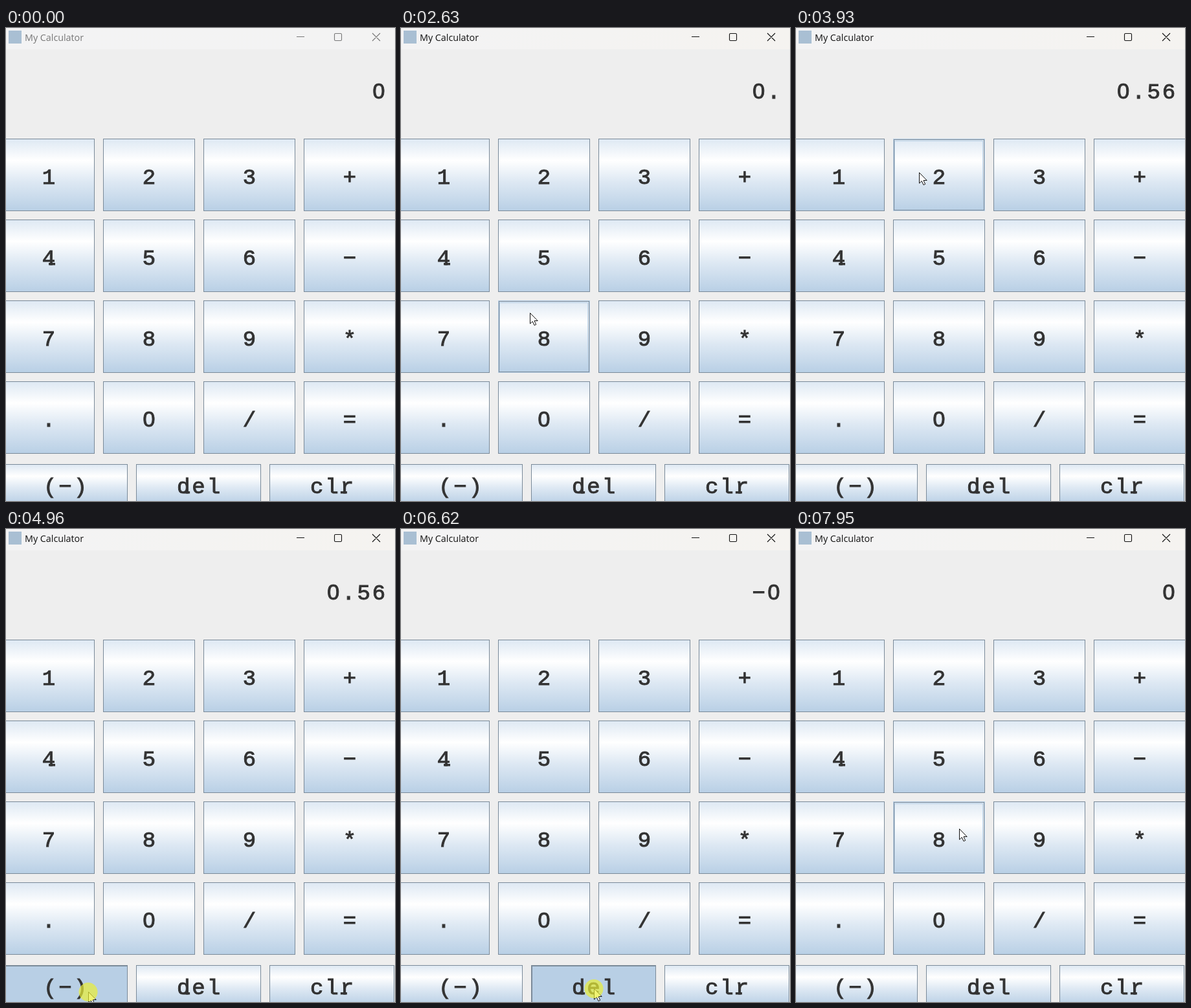
These frames come from a looping animation (601x731 px, 8 s). An HTML page with a canvas:

```html
<!DOCTYPE html>
<html lang="en">
<head>
<meta charset="utf-8">
<title>My Calculator</title>
<style>
  html, body { margin: 0; width: 100%; height: 100%; overflow: hidden; background: #eee; }
  canvas { display: block; }
</style>
</head>
<body>
<canvas id="stage" width="601" height="731"></canvas>
<script>
const ctx = document.getElementById('stage').getContext('2d');
const LOOP = 8000, STEP = 30, HOLD = 70;
const ADVANCE = 23.4;
const INK = '#333333', EDGE = '#7a8a99', BLUE = '#b8cfe5', DARK = '#111111', GREY = '#777777';

// Buttons: a 4 x 4 grid and a wider bottom row
const buttons = [...'123+456-789*.0/='].map((label, i) => ({
  label, x: -5 + 155 * (i % 4), y: 171 + 125 * Math.floor(i / 4), w: 142, h: 112
}));
['(-)', 'del', 'clr'].forEach((label, i) =>
  buttons.push({ label, x: -5 + 206 * i, y: 674, w: 193, h: 62 }));

// Pointer moves: start, end, then points passed at even intervals.
// Each move sets out from where the one before it came to rest.
const moves = [
  [380, 1030, [597, 724], [547, 482], [300, 153], [17, 158], [150, 166], [212, 450]],
  [1200, 1650, [170, 573], [125, 600], [110, 606]],
  [2330, 2930, [199, 440], [245, 362]],
  [3020, 3150, [385, 362]],
  [3690, 4290, [345, 128], [190, 223], [95, 400], [80, 580], [127, 715]],
  [5090, 5300, [298, 710]],
  [6990, 7790, [425, 430], [270, 205], [62, 512], [264, 493]],
  [7860, 7950, [252, 463]]
].map(([start, end, ...path], i, all) => ({
  start, end, path: i ? [all[i - 1].at(-1), ...path] : path
}));

const clicks = [
  [2220, '.'], [2950, '5'], [3330, '6'], [4960, '(-)'],
  [5530, 'del'], [5800, 'del'], [6080, 'del'], [6620, 'del']
];

function applyKey(shown, key) {
  if (key === '(-)') return '-' + shown;
  if (key === 'del') return shown.slice(0, -1).replace(/^-?$/, '0');
  return shown + key;
}

function spline(a, b, c, d, u) {
  return b + 0.5 * u * (c - a + u * (2 * a - 5 * b + 4 * c - d + u * (3 * (b - c) + d - a)));
}

function pointerAt(t) {
  const move = moves.filter(m => m.start <= t).pop();
  if (!move) return null;
  const { start, end, path } = move;
  const stepped = Math.floor((t - start) / STEP) * STEP;
  const pos = t >= end ? path.length - 1 : stepped / (end - start) * (path.length - 1);
  const i = Math.floor(pos);
  const near = k => path[Math.max(0, Math.min(path.length - 1, i + k))];
  const [x, y] = [0, 1].map(axis =>
    spline(...[-1, 0, 1, 2].map(k => near(k)[axis]), pos - i));
  return { x, y };
}

function rect(color, x, y, w, h) {
  ctx.fillStyle = color;
  ctx.fillRect(x, y, w, h);
}

function frame(color, x, y, w, h) {
  ctx.strokeStyle = color;
  ctx.lineWidth = 1;
  ctx.strokeRect(x + 0.5, y + 0.5, w - 1, h - 1);
}

function glyph(ch, x, y) {
  // The sans zero has no dot inside
  ctx.font = ch === '0'
    ? '34px "Liberation Sans", sans-serif'
    : '34px "Liberation Mono", monospace';
  ctx.fillStyle = ctx.strokeStyle = INK;
  ctx.lineWidth = 1;
  const shape = ch === '-' ? '\u2212' : ch;
  ctx.fillText(shape, x, y);
  ctx.strokeText(shape, x, y);
  // Slab foot
  if ('dr4'.includes(ch)) ctx.fillRect(ch === 'r' ? x - 10 : x, y - 3, 10, 3.5);
}

function mono(text, lastX, y) {
  ctx.textAlign = 'center';
  [...text].forEach((ch, i) => glyph(ch, lastX - (text.length - 1 - i) * ADVANCE, y));
}

function drawButton({ label, x, y, w, h }, hover, pressed) {
  if (pressed) {
    rect(BLUE, x, y, w, h);
    frame(EDGE, x, y, w, h);
    rect(EDGE, x, y, w, 2);
    rect(EDGE, x, y, 2, h);
  } else {
    const g = ctx.createLinearGradient(0, y, 0, y + h);
    g.addColorStop(0, '#dde8f3');
    g.addColorStop(0.3, '#ffffff');
    g.addColorStop(0.6, '#dde8f3');
    g.addColorStop(1, BLUE);
    rect(g, x, y, w, h);
    if (hover) {
      frame(BLUE, x, y, w, h);
      frame(EDGE, x + 1, y + 1, w - 2, h - 2);
      frame(BLUE, x + 2, y + 3, w - 5, h - 5);
    } else {
      frame(EDGE, x, y, w, h);
    }
  }
  mono(label, x + w / 2 + (label.length - 1) / 2 * ADVANCE, y + h / 2 + 14);
}

function drawTitle(t) {
  const active = t >= 2220;
  const bar = ctx.createLinearGradient(0, 0, 601, 0);
  bar.addColorStop(0, '#f3f3f4');
  bar.addColorStop(1, active ? '#f5f3f0' : '#f3f3f3');
  rect(bar, 0, 0, 601, 33);
  rect('#a9bfd3', 4, 4, 20, 20);

  ctx.font = '14.3px "Open Sans", sans-serif';
  ctx.textAlign = 'left';
  ctx.fillStyle = active ? DARK : t < 30 ? GREY : '#868686';
  ctx.fillText('My Calculator', 29, 20);

  rect(active ? DARK : t < 30 ? GREY : '#cccccc', 449, 13, 12, 1);
  ctx.strokeStyle = active ? DARK : GREY;
  ctx.lineWidth = 1.1;
  ctx.beginPath();
  ctx.roundRect(507.5, 8.5, 11, 11, 1.5);
  ctx.moveTo(566, 8);
  ctx.lineTo(578, 20);
  ctx.moveTo(578, 8);
  ctx.lineTo(566, 20);
  ctx.stroke();
}

const arrow = new Path2D('M.5 .5V17L4.3 13.5L7 19.5L9.7 18.3L7 12.5H12.2Z');

function drawPointer({ x, y }, pressed) {
  ctx.save();
  ctx.translate(Math.round(x), Math.round(y));
  ctx.fillStyle = '#ffffff';
  ctx.strokeStyle = DARK;
  ctx.lineWidth = 1;
  ctx.fill(arrow);
  ctx.stroke(arrow);
  if (pressed) {
    ctx.fillStyle = 'rgba(234, 238, 54, 0.7)';
    ctx.beginPath();
    ctx.arc(0, 0.5, 14.5, 0, 2 * Math.PI);
    ctx.fill();
  }
  ctx.restore();
}

function draw(t) {
  const pointer = pointerAt(t);
  const pressed = clicks.some(([down]) => t >= down && t < down + HOLD);
  const shown = clicks.filter(([down]) => t >= down + HOLD)
    .reduce((text, [, key]) => applyKey(text, key), '0');

  rect('#eeeeee', 0, 0, 601, 731);
  drawTitle(t);
  mono(shown, 576, 109);
  for (const b of buttons) {
    const hover = pointer && pointer.x >= b.x && pointer.x < b.x + b.w &&
      pointer.y >= b.y && pointer.y < b.y + b.h;
    drawButton(b, hover, hover && pressed);
  }
  if (pointer) drawPointer(pointer, pressed);
}

const start = performance.now();
function tick() {
  draw((performance.now() - start) % LOOP);
  requestAnimationFrame(tick);
}
tick();
</script>
</body>
</html>
```
